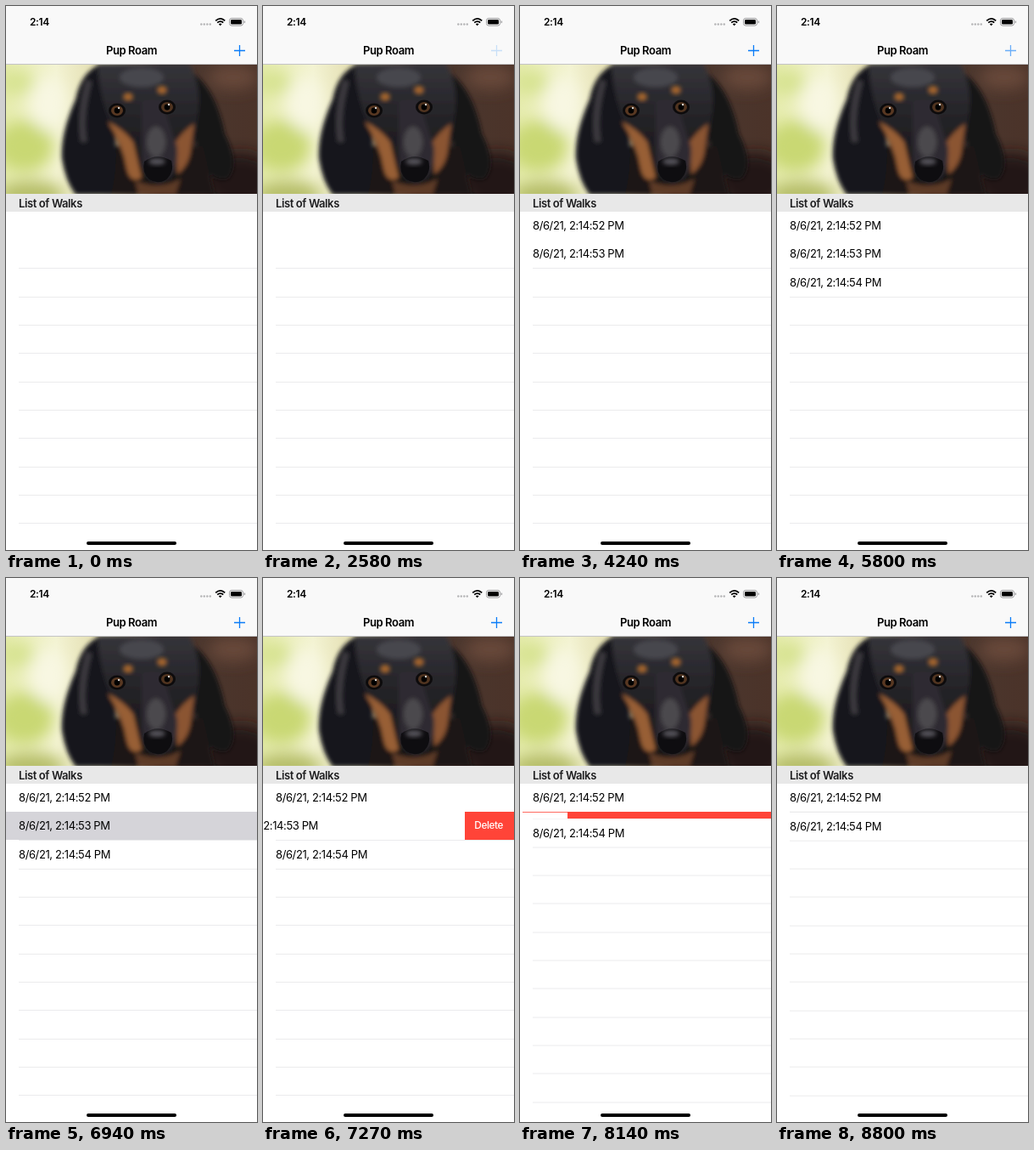
These frames come from a looping animation (296x640 px, 8.97 s). An HTML page:

```html
<!DOCTYPE html>
<html lang="en">
<head>
<meta charset="utf-8">
<title>Walk list</title>
<style>
  html, body { margin: 0; width: 100%; height: 100%; overflow: hidden; background: #fff; }
  #stage {
    position: relative; width: 296px; height: 640px; overflow: hidden; background: #fff;
    font: 400 13px Inter, "Liberation Sans", sans-serif; letter-spacing: -.03em; color: #000;
  }
  #stage div, #stage svg { position: absolute; }
  .nav { left: 0; top: 0; width: 296px; height: 68px; background: #f9f9f9; border-bottom: 1px solid #c4c4c6; }
  .time { left: 28px; top: 9px; line-height: 20px; font-size: 12px; font-weight: 600; }
  .title { left: 0; width: 296px; top: 42px; line-height: 20px; text-align: center; font-weight: 600; }
  .photo { left: 0; top: 69px; }
  .head {
    left: 0; top: 220.5px; width: 281px; height: 21.5px; padding-left: 15px;
    background: #e8e8e8; line-height: 22px; font-weight: 600; color: #1c1c1e;
  }
  .row { left: 15px; height: 33.33px; line-height: 33.33px; white-space: nowrap; }
  .sep { left: 15px; width: 281px; height: 1px; background: #ebebed; }
  #cell { left: 0; top: 275px; width: 296px; overflow: hidden; background: #fff; }
  #action { top: 0; height: 34px; background: #ff4438; overflow: hidden; }
  #action div {
    left: 11px; line-height: 33.33px; font-size: 11.8px; font-weight: 500; color: #fff;
  }
  #edge { top: 0; width: 296px; height: 1px; background: #ff6a60; }
  #below { left: 0; top: 0; width: 296px; height: 640px; }
  .home { left: 95px; top: 630px; width: 106px; height: 4px; border-radius: 2px; background: #000; }
</style>
</head>
<body>
<div id="stage">
  <div class="nav"></div>
  <div class="time">2:14</div>
  <div class="title">Pup Roam</div>

  <svg class="bar" width="296" height="69" style="left:0;top:0">
    <g fill="#b4b4b6">
      <circle cx="230.3" cy="21.5" r="1.2"/><circle cx="233.8" cy="21.5" r="1.2"/>
      <circle cx="237.3" cy="21.5" r="1.2"/><circle cx="240.8" cy="21.5" r="1.2"/>
    </g>
    <g fill="none" stroke="#000" stroke-width="1.8">
      <path d="M247.2 17.3Q252.7 12.4 258.2 17.3M249.2 19.6Q252.7 16.6 256.2 19.6"/>
    </g>
    <path d="M250.8 21.2Q252.7 19.8 254.6 21.2L252.7 23.2Z"/>
    <rect x="263.5" y="14.5" width="16" height="8.6" rx="2.6" fill="none" stroke="#9b9b9d"/>
    <rect x="265" y="16" width="13" height="5.6" rx="1.4"/>
    <path d="M280.8 17.2q1.4 .3 1.4 1.6t-1.4 1.6z" fill="#9b9b9d"/>
    <path id="plus" d="M269 52.5H282M275.5 46V59" stroke="#0a7cf8" stroke-width="1.3"/>
  </svg>

  <svg class="photo" width="296" height="151.5" viewBox="0 69 296 151.5">
    <defs>
      <linearGradient id="bg">
        <stop offset="0" stop-color="#e6ecae"/><stop offset=".2" stop-color="#f3f3d2"/>
        <stop offset=".38" stop-color="#e2dcae"/><stop offset=".62" stop-color="#4a3830"/>
        <stop offset="1" stop-color="#4b3329"/>
      </linearGradient>
      <linearGradient id="fur" x2="0" y2="1">
        <stop offset="0" stop-color="#35343a"/><stop offset=".5" stop-color="#222125"/>
        <stop offset="1" stop-color="#131114"/>
      </linearGradient>
      <filter id="soft" x="-30%" y="-30%" width="160%" height="160%"><feGaussianBlur stdDeviation="2.4"/></filter>
      <filter id="haze" x="-50%" y="-50%" width="200%" height="200%"><feGaussianBlur stdDeviation="9"/></filter>
    </defs>
    <rect y="69" width="296" height="152" fill="url(#bg)"/>
    <g filter="url(#haze)">
      <ellipse cx="22" cy="165" rx="34" ry="30" fill="#c9d873"/>
      <ellipse cx="12" cy="90" rx="22" ry="14" fill="#d7e391"/>
      <ellipse cx="50" cy="115" rx="22" ry="32" fill="#f8f7e2"/>
      <ellipse cx="30" cy="222" rx="40" ry="16" fill="#b5bd68"/>
      <ellipse cx="268" cy="84" rx="30" ry="14" fill="#694a3b"/>
      <ellipse cx="275" cy="205" rx="45" ry="32" fill="#241712"/>
    </g>
    <g filter="url(#soft)">
      <path d="M222 80Q248 100 258 150Q276 185 262 203Q240 208 230 180L214 130Z" fill="#171316"/>
      <path d="M110 165L232 165L246 222H84Z" fill="#1d1412"/>
      <path d="M112 68Q88 78 82 110Q64 150 66 180Q70 206 82 222H124Q136 180 124 120Z" fill="#19181b"/>
      <path d="M108 68H216Q232 96 226 130Q222 180 204 205Q180 220 158 205Q140 190 128 150Q110 110 108 68Z" fill="url(#fur)"/>
      <path d="M98 88Q86 130 92 160" fill="none" stroke="#3c3b40" stroke-width="7"/>
      <ellipse cx="160" cy="84" rx="26" ry="11" fill="#47474d"/>
      <path d="M120 136Q140 146 150 160L160 202Q146 210 142 190Q138 164 120 136Z" fill="#985f36"/>
      <path d="M222 138Q208 148 200 160L202 198Q216 188 218 168Z" fill="#8b5431"/>
      <path d="M152 205Q180 218 206 203L200 222H156Z" fill="#5d3a26"/>
      <path d="M160 112Q172 108 184 112L202 166Q204 204 180 207Q158 204 160 166Z" fill="#2e2c30"/>
      <ellipse cx="177" cy="160" rx="11" ry="18" fill="#4c4a4e"/>
    </g>
    <ellipse cx="144" cy="107" rx="6" ry="5" fill="#a2642f" filter="url(#soft)"/>
    <ellipse cx="184" cy="99" rx="6" ry="5" fill="#a2642f" filter="url(#soft)"/>
    <g>
      <ellipse cx="131" cy="123" rx="10" ry="8.5" fill="#0d0b0c"/><ellipse cx="131" cy="123" rx="7" ry="6" fill="#583822"/>
      <ellipse cx="190" cy="119" rx="10" ry="8.5" fill="#0d0b0c"/><ellipse cx="190" cy="119" rx="7" ry="6" fill="#503420"/>
      <circle cx="131" cy="123" r="3.4"/><circle cx="190" cy="119" r="3.4"/>
      <circle cx="133" cy="120" r="1.2" fill="#d9d6d2"/><circle cx="192" cy="116" r="1.2" fill="#d9d6d2"/>
    </g>
    <path d="M163 183Q178 172 195 182Q199 196 188 205Q178 210 169 204Q160 196 163 183Z" fill="#0e0d10"/>
    <ellipse cx="178" cy="183" rx="10" ry="4" fill="#55535a" filter="url(#soft)"/>
  </svg>

  <div class="head">List of Walks</div>
  <div class="row walk" style="top:242px">8/6/21, 2:14:52 PM</div>
  <div class="sep" style="top:274.8px"></div>
  <div id="below"><div class="row walk" style="top:308.67px">8/6/21, 2:14:54 PM</div></div>
  <div id="cell">
    <div id="label" class="row walk" style="top:0">8/6/21, 2:14:53 PM</div>
    <div id="edge"></div>
    <div id="action"><div>Delete</div></div>
  </div>
  <div class="home"></div>
</div>

<script>
  const LOOP = 8970, WIDTH = 296, ROW = 33.33, OPEN = 58;
  const $ = id => document.getElementById(id);
  const clamp = v => Math.min(1, Math.max(0, v));

  const [first, third, second] = document.querySelectorAll('.walk');
  const presses = [[2580, 2750, first], [3700, 3880, second], [5340, 5510, third]];

  const runs = [[2750, 3210, 5], [3700, 4240, 6], [5340, 5920, 6], [6940, 7800, 9], [7910, 8800, 9]];

  for (let i = 2; i <= 12; i++) {
    const line = document.createElement('div');
    line.className = 'sep';
    line.style.top = 241.6 + ROW * i + 'px';
    $('below').append(line);
  }

  function snap(t) {
    const run = runs.findLast(r => t >= r[0]);
    if (!run) return t;
    const [from, to, count] = run;
    const step = (to - from) / (count - 1);
    return from + Math.min(count - 1, Math.floor((t - from) / step + 1e-6)) * step;
  }

  function plusAlpha(t) {
    const press = presses.findLast(p => t >= p[0]);
    return press ? 0.2 + 0.8 * clamp((t - press[1]) / 360) : 1;
  }

  // Critically damped spring
  function spring(ms) {
    const x = Math.max(0, ms) * 0.011;
    return 1 - (1 + x) * Math.exp(-x);
  }

  function draw(now) {
    const time = now % LOOP, t = snap(time);
    $('plus').style.opacity = time < runs[0][0] ? plusAlpha(time) : plusAlpha(t);
    for (const [, release, row] of presses) row.style.visibility = t >= release ? 'visible' : 'hidden';

    const drag = 1 - (1 - clamp((t - 6990) / 330)) ** 3;
    const gone = t >= 7910 ? spring(t - 7880) : 0;
    const offset = OPEN * drag + (WIDTH - OPEN) * gone;

    $('cell').style.height = ROW * (1 - gone) + 'px';
    $('cell').style.background = t >= 6940 && t < 7040 ? '#d5d4d9' : '#fff';
    $('label').style.transform = `translateX(${-offset}px)`;
    $('action').style.left = WIDTH - offset + 'px';
    $('action').style.width = offset + 'px';
    $('edge').style.left = WIDTH - offset - 53 + 'px';
    $('edge').style.visibility = gone ? 'visible' : 'hidden';
    $('below').style.transform = `translateY(${-ROW * gone}px)`;
  }

  function tick() {
    draw(performance.now());
    requestAnimationFrame(tick);
  }
  tick();
</script>
</body>
</html>
```
